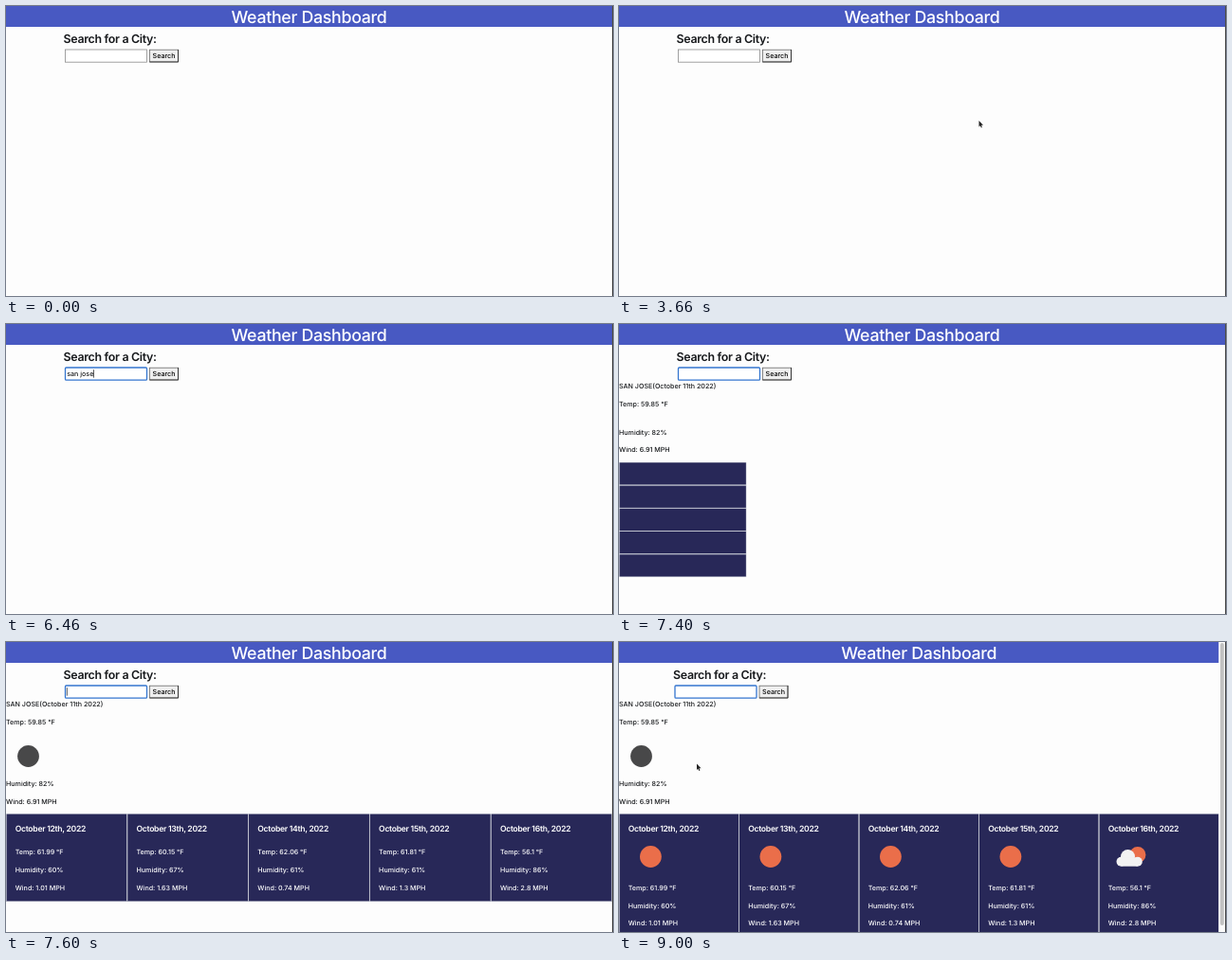
Recreate the animation shown at these times as an HTML page. Size 640 by 306 pixels, loop 9200 ms.

```html
<!DOCTYPE html>
<html lang="en">
<head>
<meta charset="utf-8">
<title>Weather Dashboard</title>
<style>
  html, body { margin: 0; width: 100%; height: 100%; overflow: hidden; background: #fdfdfd; }
  svg { display: block; width: 640px; height: 306px; }
  text {
    font: 500 7.11px Inter, "Liberation Sans", sans-serif; font-optical-sizing: none;
    text-rendering: geometricPrecision; fill: #16181b; white-space: pre;
  }
  .h1 { font-size: 17.8px; letter-spacing: -.017em; fill: #fff; text-anchor: middle; }
  .h3 { font-size: 12.4px; font-weight: 600; letter-spacing: -.025em; }
  .h5 { font-size: 8.6px; font-weight: 600; letter-spacing: -.034em; fill: #fff; }
  .mid { text-anchor: middle; fill: #000; }
  .light { fill: #fff; }
</style>
</head>
<body>
<svg id="stage" viewBox="0 0 640 306"></svg>
<script>
const stage = document.getElementById('stage');
const LOOP = 9200, TICK = 1000 / 15;

// All times below are in ticks of 1/15 s.
const CLICK = 68, HIDE = 80, ENTER = 104, RESULT = 111, ICON = 112, CARDS = 114, LOADED = 115, RETURN = 118;
const query = 'san jose', keys = [80, 82, 84, 88, 91, 94, 96, 97];
const caretOn = [[68, 79], [80, 111], [114, 121], [127, 135]];
const path = [ // tick, x, y
  [1, 632, 164], [5, 390, 121], [54, 390, 121], [55, 380, 121],
  [67, 112, 52], [70, 112, 52], [76, 176, 98], [117, 176, 98], [123, 82.5, 128.5]
];
const days = [ // date, temperature, humidity, wind
  ['12', '61.99', 60, '1.01'], ['13', '60.15', 67, '1.63'], ['14', '62.06', 61, '0.74'],
  ['15', '61.81', 61, '1.3'], ['16', '56.1', 86, '2.8']
];

const text = (x, y, s, c = '') => `<text x="${x}" y="${y}" class="${c}">${s}</text>`;
const rect = (x, y, w, h, fill, more = '') => `<rect x="${x}" y="${y}" width="${w}" height="${h}" fill="${fill}" ${more}/>`;
const disc = (x, y, r, fill) => `<circle cx="${x}" cy="${y}" r="${r}" fill="${fill}"/>`;
const panel = (x, y, w, h) => rect(x + .22, y + .22, w - .44, h - .44, '#282858', 'stroke="#dee2e6" stroke-width=".44"');

function searchForm(k, x) {
  const focus = k >= CLICK;
  const typed = k < ENTER ? query.slice(0, keys.filter(t => t <= k).length) : '';
  const caret = caretOn.some(([a, b]) => k >= a && k < b) ? '<tspan dx="-1.1">|</tspan>' : '';
  return text(x, 38.7, 'Search for a City:', 'h3') +
    rect(x + 2, 46, 86, 13.2, '#fff',
      focus ? 'rx="1" stroke="#3576cf" stroke-width="1.3"' : 'stroke="#8a8a8a" stroke-width=".8"') +
    text(x + 3.7, 55.2, typed + caret) +
    rect(x + 91, 46.2, 30, 12.8, '#efefef', 'stroke="#6a6a6a" stroke-width=".8"') +
    `<path d="M${x + 91} 59h30v-13" fill="none" stroke="#222" stroke-width=".8"/>` +
    text(x + 106, 55.2, 'Search', 'mid');
}

function today(k) {
  const drop = k >= ICON ? 35.4 : 0;
  return text(0, 68, 'SAN JOSE(October 11th 2022)') +
    text(0, 86.8, 'Temp: 59.85 °F') +
    (drop ? disc(23.5, 120.5, 11.4, '#484849') : '') +
    text(0, 116.6 + drop, 'Humidity: 82%') +
    text(0, 135.2 + drop, 'Wind: 6.91 MPH');
}

function sky(x, cloudy) {
  const sun = '#ea6e4a', cloud = '#f2f2f2';
  if (!cloudy) return disc(x, 226.5, 11.4, sun);
  return disc(x + 7.5, 224.4, 8.5, sun) +
    disc(x - 9.9, 231.7, 5, cloud) + disc(x - 2.9, 226.5, 7.5, cloud) + disc(x + 7.4, 231.7, 5, cloud) +
    rect(x - 9.9, 227.5, 17.3, 9.2, cloud);
}

function forecast(k, width) {
  if (k < CARDS) {
    const top = k >= ICON ? 181.2 : 145.8;
    return days.map((_, i) => panel(0, top + i * 24.25, 134.3, 24.25)).join('');
  }
  const loaded = k >= LOADED, step = width / 5, drop = loaded ? 37.6 : 0;
  return days.map(([date, temp, humidity, wind], i) => {
    const x = i * step, left = x + 9.7;
    return panel(x, 181, step, 93 + drop) +
      text(left, 199.7, `October ${date}th, 2022`, 'h5') +
      (loaded ? sky(x + 33.4, i === 4) : '') +
      text(left, 224.2 + drop, `Temp: ${temp} °F`, 'light') +
      text(left, 242.9 + drop, `Humidity: ${humidity}%`, 'light') +
      text(left, 261.5 + drop, `Wind: ${wind} MPH`, 'light');
  }).join('');
}

function pointer(k) {
  if (k < 1 || (k >= HIDE && k < RETURN)) return '';
  const n = path.findIndex(p => p[0] >= k);
  let [x, y] = path.at(-1).slice(1);
  if (n === 0) [x, y] = path[0].slice(1);
  else if (n > 0) {
    const [a, ax, ay] = path[n - 1], [b, bx, by] = path[n];
    const u = (k - a) / (b - a), e = u * u * (3 - 2 * u);
    x = ax + (bx - ax) * e;
    y = ay + (by - ay) * e;
  }
  return `<path transform="translate(${x - .5} ${y})" d="M0 0V6.4L1.4 5.2L2.4 7.4L3.4 6.9L2.5 4.8H4.5Z"
    fill="#222" stroke="#fff" stroke-width=".6" paint-order="stroke"/>`;
}

function draw(now) {
  const k = Math.floor((now % LOOP + 7) / TICK);
  const scrolls = k >= LOADED, width = scrolls ? 632.5 : 639;
  stage.innerHTML =
    rect(0, 0, width, 22, '#4859c2') +
    text(width / 2, 18, 'Weather Dashboard', 'h1') +
    searchForm(k, scrolls ? 57 : 60.5) +
    (k >= RESULT ? today(k) + forecast(k, width) : '') +
    (scrolls ? rect(632.5, 0, 6.5, 306, '#fafafa') + rect(634, 1, 3.8, 298, '#c1c1c1', 'rx="1.9"') : '') +
    rect(639, 0, 1, 306, '#4a4a4a') +
    pointer(k);
  requestAnimationFrame(draw);
}
requestAnimationFrame(draw);
</script>
</body>
</html>
```
